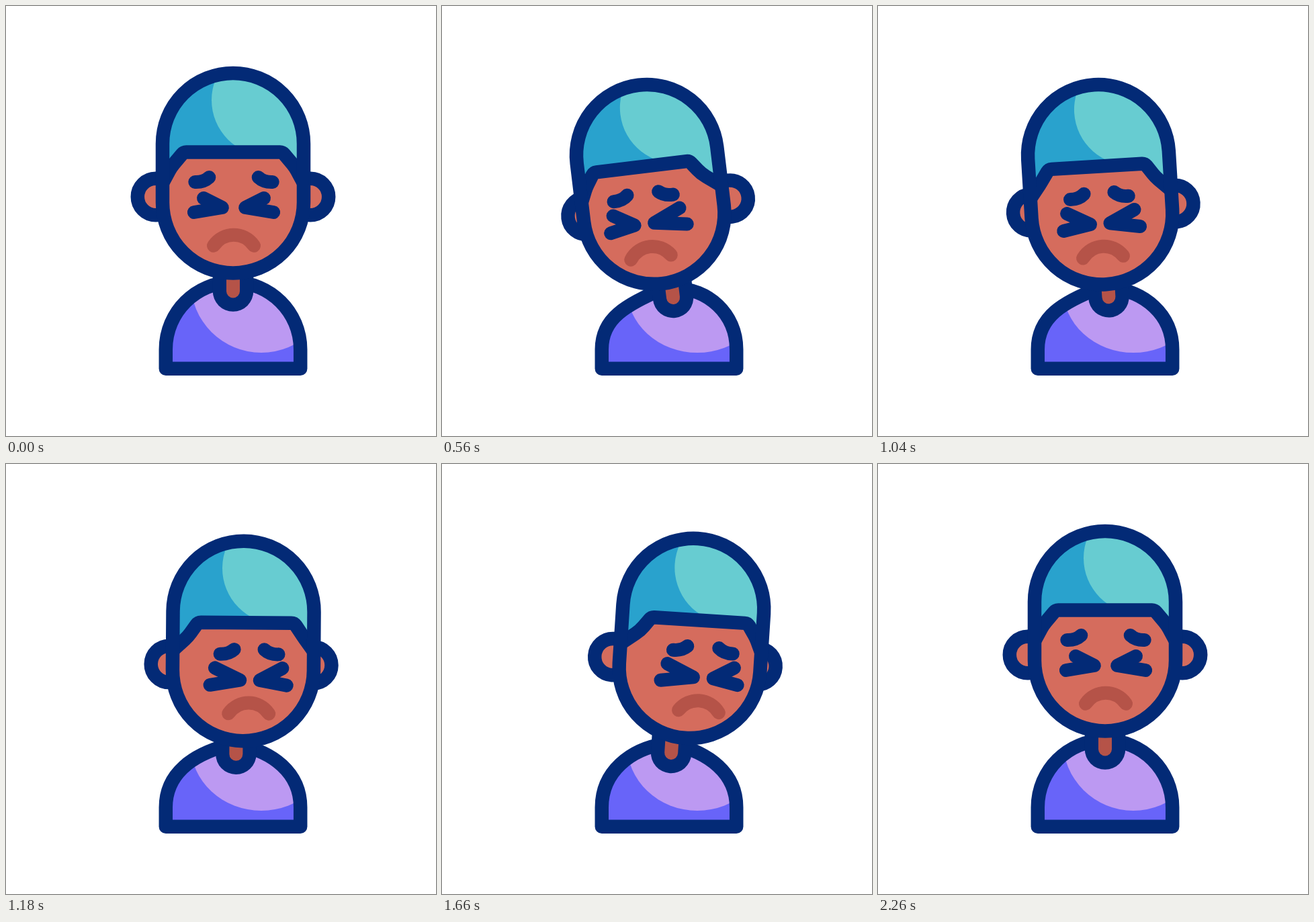
An HTML page with a canvas that plays this animation: 640x640 px, repeating every 2.4 s.

```html
<!DOCTYPE html>
<html lang="en">
<head>
<meta charset="utf-8">
<title>Head shake</title>
<style>
  html, body { margin: 0; width: 100%; height: 100%; overflow: hidden; background: #fff; }
  canvas { display: block; width: 640px; height: 640px; }
</style>
</head>
<body>
<canvas id="stage" width="640" height="640"></canvas>
<script>
const ctx = document.getElementById('stage').getContext('2d');
const LOOP = 2400, LEFT_AT = 710, RIGHT_AT = 1500, END_AT = 2260;
const NAVY = '#032a76', SKIN = '#d56c5d', SHADE = '#b55348';
const HAIR = '#29a2cd', HAIR_LIGHT = '#67ccd1', SHIRT = '#6864f9', SHIRT_LIGHT = '#bc99f2';
const LINE = 20.5, MID = 338, SIDES = [-1, 1];

// cubic-bezier(.5, 0, .5, 1), solved with Newton steps
function ease(x) {
  let u = x;
  for (let i = 0; i < 6; i++) {
    u -= (1.5 * u - 1.5 * u * u + u * u * u - x) / (1.5 - 3 * u + 3 * u * u);
  }
  return u * u * (3 - 2 * u);
}

const progress = (t, from, to) => ease(Math.min(1, Math.max(0, (t - from) / (to - from))));

// How far the figure is turned to the left and to the right, each 0 to 1.
function swing(t) {
  const out = progress(t, 0, LEFT_AT);
  const across = progress(t, LEFT_AT, RIGHT_AT);
  const back = progress(t, RIGHT_AT, END_AT);
  return { left: out - across, right: across - back };
}

function getPose(t) {
  const { left, right } = swing(t);
  const sink = left && right ? v => v : v => v ** 1.3;
  return {
    left, right,
    x: MID - 24.3 * left + 33 * right,
    y: 292.5 + 18 * sink(left) + 11.6 * sink(right) + 5 * left * right,
    tilt: (4 * right - 7.4 * left) * Math.PI / 180,
    drop: 10.2 * left + 5.9 * right
  };
}

function fill(color, path) {
  ctx.fillStyle = color;
  ctx.fill(path);
}

function stroke(color, width, path) {
  ctx.strokeStyle = color;
  ctx.lineWidth = width;
  ctx.stroke(path);
}

function ellipse(x, y, rx, ry = rx) {
  const path = new Path2D();
  path.ellipse(x, y, rx, ry, 0, 0, 2 * Math.PI);
  return path;
}

function polyline(...points) {
  const path = new Path2D();
  for (const [x, y] of points) path.lineTo(x, y);
  return path;
}

// Curve points from the neck outwards; a sagging shoulder bends lower and wider.
function shoulder(side, sag, drop) {
  return [
    [MID + side * drop, 411 + drop],
    [MID + side * (55.2 + 0.2 * sag), 411 + sag],
    [MID + side * 100.2, 455.8 + 0.2 * sag],
    [MID + side * 100.2, 511]
  ];
}

function drawBody({ left, right, tilt, drop }) {
  const west = shoulder(-1, 37 * left + 14 * right, drop).reverse();
  const east = shoulder(1, 10 * left + 20 * right, drop);
  const body = polyline([west[0][0], 539.7], west[0]);
  body.bezierCurveTo(...west.slice(1).flat());
  body.lineTo(...east[0]);
  body.bezierCurveTo(...east.slice(1).flat());
  body.lineTo(east[3][0], 539.7);
  body.closePath();

  fill(SHIRT, body);
  ctx.save();
  ctx.clip(body);
  fill(SHIRT_LIGHT, ellipse(380, 411 + drop, 105, 105 - drop));
  ctx.restore();
  stroke(NAVY, LINE, body);

  const x = MID + 6.5 * left + 3.4 * right, y = 424.5 + drop;
  const neck = polyline([x, y], [x + 34 * Math.sin(tilt), y - 34 * Math.cos(tilt)]);
  stroke(NAVY, 60.5, neck);
  stroke(SHADE, 20, neck);
}

function drawHair(head, place) {
  const [[leftEnd, rightEnd], [leftBend, rightBend], [leftCorner, rightCorner]] = [
    SIDES.map(side => place(side, 105, -29)),
    SIDES.map(side => place(side, 92, -53, 4, 16, 3)),
    SIDES.map(side => place(side, 73.5, -75, 9, 13, 4))
  ];
  const hairline = polyline(leftEnd);
  hairline.arcTo(...leftBend, ...leftCorner, 60);
  hairline.arcTo(...leftCorner, ...rightCorner, 8);
  hairline.arcTo(...rightCorner, ...rightBend, 8);
  hairline.arcTo(...rightBend, ...rightEnd, 60);
  hairline.lineTo(...rightEnd);

  const hair = new Path2D(hairline);
  hair.lineTo(120, -210);
  hair.lineTo(-120, -210);
  hair.closePath();

  const light = new Path2D();
  light.arc(51, -152.5, 83, -Math.PI / 2, Math.PI / 2, true);
  light.lineTo(120, -20);
  light.lineTo(120, -235.5);

  ctx.save();
  ctx.clip(head);
  fill(HAIR, hair);
  ctx.clip(hair);
  fill(HAIR_LIGHT, light);
  ctx.restore();
  stroke(NAVY, LINE, hairline);
}

function drawFace(place) {
  const [[x0, y], [x1]] = SIDES.map(side => place(side, 30, 64.2, 16, 16));
  const mouth = polyline([x0, y]);
  mouth.bezierCurveTo(x0 + 15, y - 21.3, x1 - 15, y - 21.3, x1, y);
  stroke(SHADE, 20, mouth);

  for (const side of SIDES) {
    const brow = polyline(place(side, 57.7, -30.5, 2.5, 31, 6.3));
    brow.quadraticCurveTo(
      ...place(side, 44.7, -30, 2.5, 31, 6.3),
      ...place(side, 36.7, -37.5, 2.5, 31, 6.3)
    );
    stroke(NAVY, 20, brow);

    stroke(NAVY, 20, polyline(
      place(side, 45, -6.5, 20, 9.5, 3),
      place(side, 17.2, 7.5, 17.5, 22.5, 7),
      place(side, 59.1, 14.5, 11.7, 15.8, 7.5)
    ));
  }
}

function drawHead({ left, right, x, y, tilt }) {
  // Mirrored point that slides by lead on the side turned towards, else by trail.
  const place = (side, px, py, lead = 0, trail = 0, sink = 0) => {
    const [toLeft, toRight] = side < 0 ? [lead, trail] : [trail, lead];
    return [side * px + right * toRight - left * toLeft, py + sink * (left + right)];
  };

  ctx.save();
  ctx.translate(x, y);
  ctx.rotate(tilt);

  for (const side of SIDES) {
    const ear = ellipse(...place(side, 115, -8.5, -15.6), 27.2);
    fill(SKIN, ear);
    stroke(NAVY, LINE, ear);
  }

  const head = new Path2D();
  head.arc(0, -87.5, 105, Math.PI, 0);
  head.arc(0, 0, 105, 0, Math.PI);
  head.closePath();
  fill(SKIN, head);
  drawHair(head, place);
  stroke(NAVY, LINE, head);

  ctx.translate(1 + 1.8 * (left + right), 0);
  drawFace(place);
  ctx.restore();
}

function draw(time) {
  const pose = getPose(time % LOOP);
  ctx.fillStyle = '#fff';
  ctx.fillRect(0, 0, 640, 640);
  drawBody(pose);
  drawHead(pose);
}

ctx.lineCap = ctx.lineJoin = 'round';
const start = performance.now();
function tick() {
  draw(performance.now() - start);
  requestAnimationFrame(tick);
}
tick();
</script>
</body>
</html>
```
